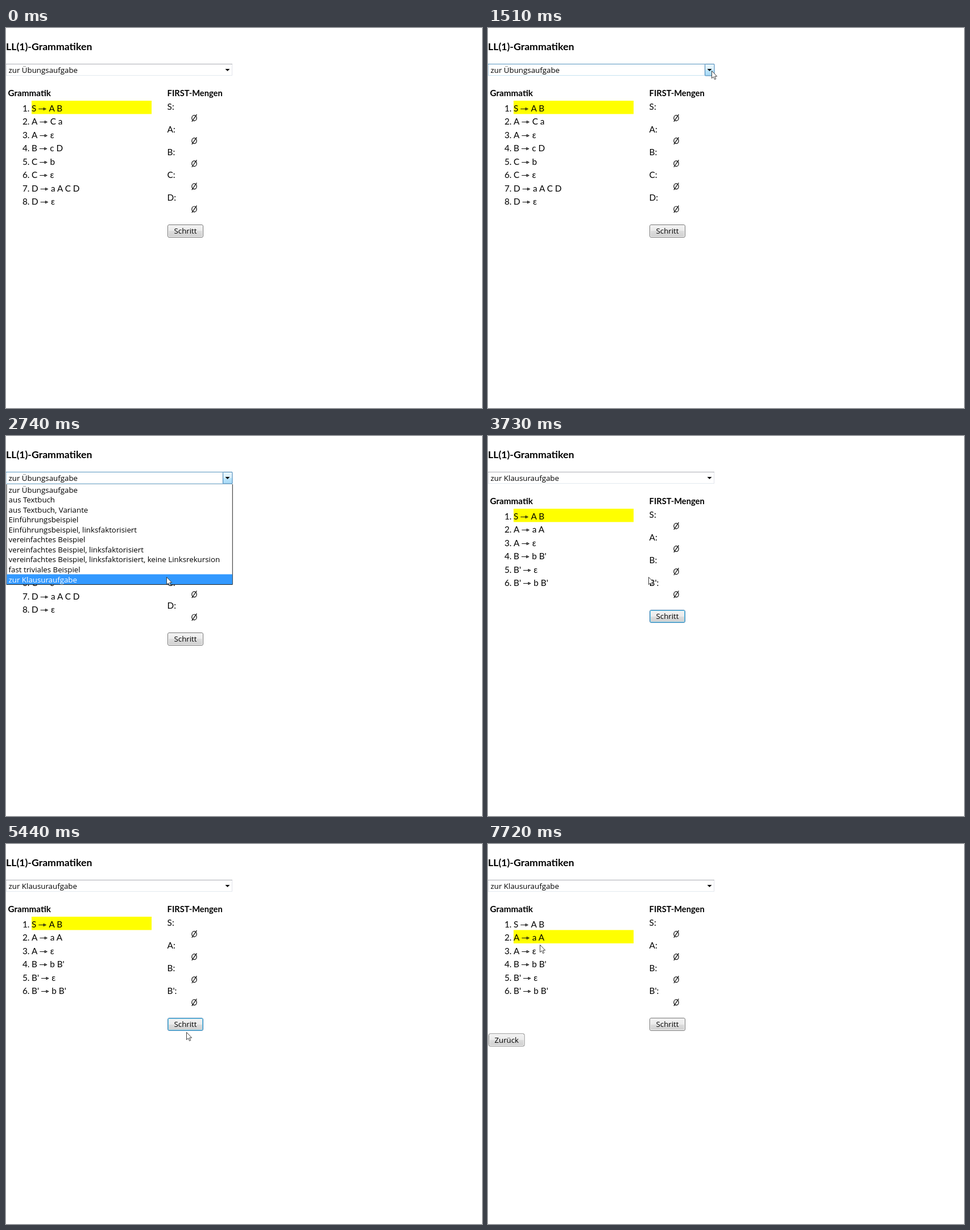
Animation of 837 by 669 pixels, one loop 8000 ms. Source, as an HTML page:

```html
<!DOCTYPE html>
<html lang="de">
<head>
<meta charset="utf-8">
<title>LL(1)-Grammatiken</title>
<style>
  html, body { margin: 0; width: 100%; height: 100%; overflow: hidden; background: #fff; }
  svg { display: block; }
  text { font: 15.3px Lato, sans-serif; fill: #000; white-space: pre; }
  .bold { font-weight: 700; }
  .ui { font: 13.3px "Open Sans", "Noto Sans", sans-serif; }
  .mid { text-anchor: middle; }
  .end { text-anchor: end; }
</style>
</head>
<body>
<svg id="stage" width="837" height="669" viewBox="0 0 837 669"></svg>
<script>
const LOOP = 8000, STEP = 30, PHASE = 10;
const ROW = 23.45, ITEM = 17.56, LIST_TOP = 85.4;

const options = [
  'zur Übungsaufgabe', 'aus Textbuch', 'aus Textbuch, Variante',
  'Einführungsbeispiel', 'Einführungsbeispiel, linksfaktorisiert',
  'vereinfachtes Beispiel', 'vereinfachtes Beispiel, linksfaktorisiert',
  'vereinfachtes Beispiel, linksfaktorisiert, keine Linksrekursion',
  'fast triviales Beispiel', 'zur Klausuraufgabe'
];
const exercise = ['S>A B', 'A>C a', 'A>ε', 'B>c D', 'C>b', 'C>ε', 'D>a A C D', 'D>ε'];
const exam = ['S>A B', 'A>a A', 'A>ε', "B>b B'", "B'>ε", "B'>b B'"];

const ease = {
  in: u => u * u,
  out: u => 1 - (1 - u) ** 2,
  late: u => 1 - (1 - u) ** 3,
  both: u => u * u * (3 - 2 * u)
};

// Pointer strokes: each bends past "via" and rests at "end"
const home = [823, 20];
const strokes = [
  { from: 460, to: 1270, ease: 'both', via: [600, 6], end: [376, 79] },
  { from: 1270, to: 1510, ease: 'both', via: [390, 79], end: [393, 75] },
  { from: 2200, to: 2740, ease: 'late', via: [297, 150], end: [282, 248] },
  { from: 3700, to: 4420, ease: 'in', via: [175, 265], end: [218, 333] },
  { from: 4420, to: 4870, ease: 'out', via: [265, 425], end: [339, 384] },
  { from: 4870, to: 5440, ease: 'both', via: [326, 360], end: [317, 331] },
  { from: 5440, to: 5800, ease: 'out', via: [320, 318], end: [322, 314] },
  { from: 6310, to: 6340, ease: 'both', via: [320, 314], end: [317, 314] },
  { from: 6580, to: 7330, ease: 'both', via: [60, 122], end: [91, 177] }
];

function pointerAt(t) {
  let at = home;
  for (const s of strokes) {
    if (t < s.from) break;
    const u = ease[s.ease](Math.min(1, (t - s.from) / (s.to - s.from))), v = 1 - u;
    at = at.map((p, k) => p * v * v + 2 * s.via[k] * u * v + s.end[k] * u * u);
  }
  return at;
}

// Button looks: edge, four gradient stops, inner edge
const skins = {
  normal: ['#707070', '#f2f2f2', '#ebebeb', '#dddddd', '#cfcfcf', '#fbfbfb'],
  focus: ['#3c7fb1', '#f2f2f2', '#ebebeb', '#dddddd', '#cfcfcf', '#6fcdee'],
  hover: ['#3c7fb1', '#eaf6fd', '#d9f0fc', '#bee6fd', '#a7d9f5', '#f3fafe'],
  pressed: ['#2c628b', '#e5f4fc', '#c4e5f6', '#98d1ef', '#78bfe2', '#9eb9c9']
};

const text = (x, y, s, cls = '', extra = '') =>
  `<text x="${x}" y="${y}" class="${cls}" ${extra}>${s}</text>`;
const rect = (x, y, w, h, attrs) =>
  `<rect x="${x}" y="${y}" width="${w}" height="${h}" ${attrs}/>`;
const line = (d, color, id = '') =>
  `<path id="${id}" d="${d}" fill="none" stroke="${color}"/>`;

const gradient = name => {
  const [, a, b, c, d] = skins[name];
  return `<linearGradient id="${name}" x2="0" y2="1"><stop stop-color="${a}"/>` +
    `<stop offset=".5" stop-color="${b}"/><stop offset=".5" stop-color="${c}"/>` +
    `<stop offset="1" stop-color="${d}"/></linearGradient>`;
};

const button = (id, x, y, w, label) =>
  `<g id="${id}" transform="translate(${x} ${y})">` +
  rect(.5, .5, w - 1, 22, 'rx="2.5" class="edge" fill="url(#normal)" stroke="#707070"') +
  rect(1.5, 1.5, w - 3, 20, 'rx="1.5" class="inner" fill="none" stroke="#fbfbfb"') +
  text(w / 2, 16.4, label, 'ui mid') + '</g>';

// The right part is moved behind the measured left side later
function rule(src, i) {
  const [left, right] = src.split('>');
  const y = 147 + i * ROW, m = Math.round(y - 5) + .5;
  return text(41.4, y, `${i + 1}.`, 'end') + text(45, y, left, 'left') +
    `<g>${text(18.3, y, right)}<path d="M0 ${m}h9m0 -1.7l3.4 1.7l-3.4 1.7z" fill="none" stroke="#111" stroke-width="1.2"/></g>`;
}

function firstSet(name, i) {
  const y = 144 + i * 40.1, c = 158.5 + i * 40.1;
  return text(283.6, y, `${name}:`) +
    `<g fill="none" stroke="#000" stroke-width="1.2"><ellipse cx="331" cy="${c}" rx="4.2" ry="4.9"/>` +
    `<path d="M326.8 ${c + 6.3}L335.4 ${c - 6.3}"/></g>`;
}

function page(id, rules) {
  const names = [...new Set(rules.map(r => r.split('>')[0]))];
  return `<g id="${id}">${rules.map(rule).join('')}${names.map(firstSet).join('')}</g>`;
}

const stage = document.getElementById('stage');
stage.innerHTML =
  `<defs>${Object.keys(skins).map(gradient).join('')}</defs>` +
  text(0, 38.5, 'LL(1)-Grammatiken', 'bold', 'style="font-size:17.7px"') +
  text(3.4, 119.7, 'Grammatik', 'bold') +
  text(283.6, 119.7, 'FIRST-Mengen', 'bold', 'style="font-size:14.7px"') +
  rect(45, 128, 211, ROW, 'id="mark" fill="#ff0"') +
  page('exercise', exercise) + page('exam', exam) +
  button('next', 284, 346, 63, 'Schritt') + button('back', 1, 333.5, 63.5, 'Zurück') +
  line('M.5 64V84M397.5 64V84', '#e2e3ea', 'sides') +
  line('M0 83.5H398', '#e3e9ef', 'bottom') +
  line('M0 63.5H398', '#abadb3', 'top') +
  rect(381.5, 63.5, 16.5, 20.5, 'id="drop" rx="1"') +
  '<path d="M385.5 72h8l-4 4z"/>' +
  text(4.6, 78.6, '', 'ui', 'id="value"') +
  '<g id="list">' + rect(1, 84, 397, 177, 'fill="#fff"') +
  line('M1 84.5H398', '#8fb0c8') + line('M1 85V261.5H398.3V85', '#222') +
  rect(1.4, 0, 396.6, ITEM, 'id="pick" fill="#39f"') +
  options.map((s, i) => text(4.6, (99.5 + i * ITEM).toFixed(1), s, 'ui item')).join('') + '</g>' +
  '<path id="pointer" d="M.5 .5V13.6L3.5 10.9L5.6 15.6L7.7 14.7L5.7 10.1H9.6Z" fill="#fff" stroke="#333" stroke-width=".95"/>';

const $ = id => document.getElementById(id);
const set = (node, attrs) => { for (const k in attrs) node.setAttribute(k, attrs[k]); };
const show = (id, on) => set($(id), { visibility: on ? 'visible' : 'hidden' });
const items = [...document.querySelectorAll('.item')];

for (const el of document.querySelectorAll('.left')) {
  const x = 45 + el.getComputedTextLength() + 4;
  set(el.nextElementSibling, { transform: `translate(${x} 0)` });
}

function skin(id, name) {
  const [edge, , , , , inner] = skins[name];
  set($(id).querySelector('.edge'), { fill: `url(#${name})`, stroke: edge });
  set($(id).querySelector('.inner'), { stroke: inner });
}

function draw(time) {
  const t = Math.floor((time - PHASE) / STEP) * STEP + PHASE;
  const [x, y] = pointerAt(t).map(Math.round);
  show('pointer', t >= 100);
  set($('pointer'), { transform: `translate(${x} ${y})` });

  const open = t >= 1540 && t < 3130;
  const hot = open || t < 3130 && x < 398 && y >= 63 && y < 84;
  set($('top'), { stroke: hot ? '#5794bf' : '#abadb3' });
  set($('sides'), { stroke: hot ? '#b7d5ea' : '#e2e3ea' });
  set($('bottom'), { stroke: hot ? '#c7e2f1' : '#e3e9ef' });
  const face = t >= 1540 && t < 1900 ? 'pressed' : 'hover';
  show('drop', hot);
  set($('drop'), { fill: `url(#${face})`, stroke: skins[face][0] });
  $('value').textContent = options[t < 3130 ? 0 : 9];

  // The highlight trails the pointer by one step
  const over = Math.floor((pointerAt(t - STEP)[1] - LIST_TOP) / ITEM);
  const row = Math.max(0, Math.min(9, over));
  show('list', open);
  set($('pick'), { y: LIST_TOP + row * ITEM });
  items.forEach((el, i) => { el.style.fill = i === row ? '#fff' : '#000'; });

  const loaded = t >= 3280;
  show('exercise', !loaded);
  show('exam', loaded);
  set($('mark'), { y: t < 7600 ? 128 : 128 + ROW });
  show('back', t >= 7720);

  const inside = x >= 284 && x < 347 && y >= 306 && y < 329;
  set($('next'), { transform: `translate(284 ${loaded ? 306 : 346})` });
  skin('next', t < 3340 ? 'normal' : t >= 6190 && t < 6610 ? 'pressed' :
    inside ? 'hover' : t < 6610 ? 'focus' : 'normal');
}

const start = performance.now();
function tick() {
  draw((performance.now() - start) % LOOP);
  requestAnimationFrame(tick);
}
tick();
</script>
</body>
</html>
```
